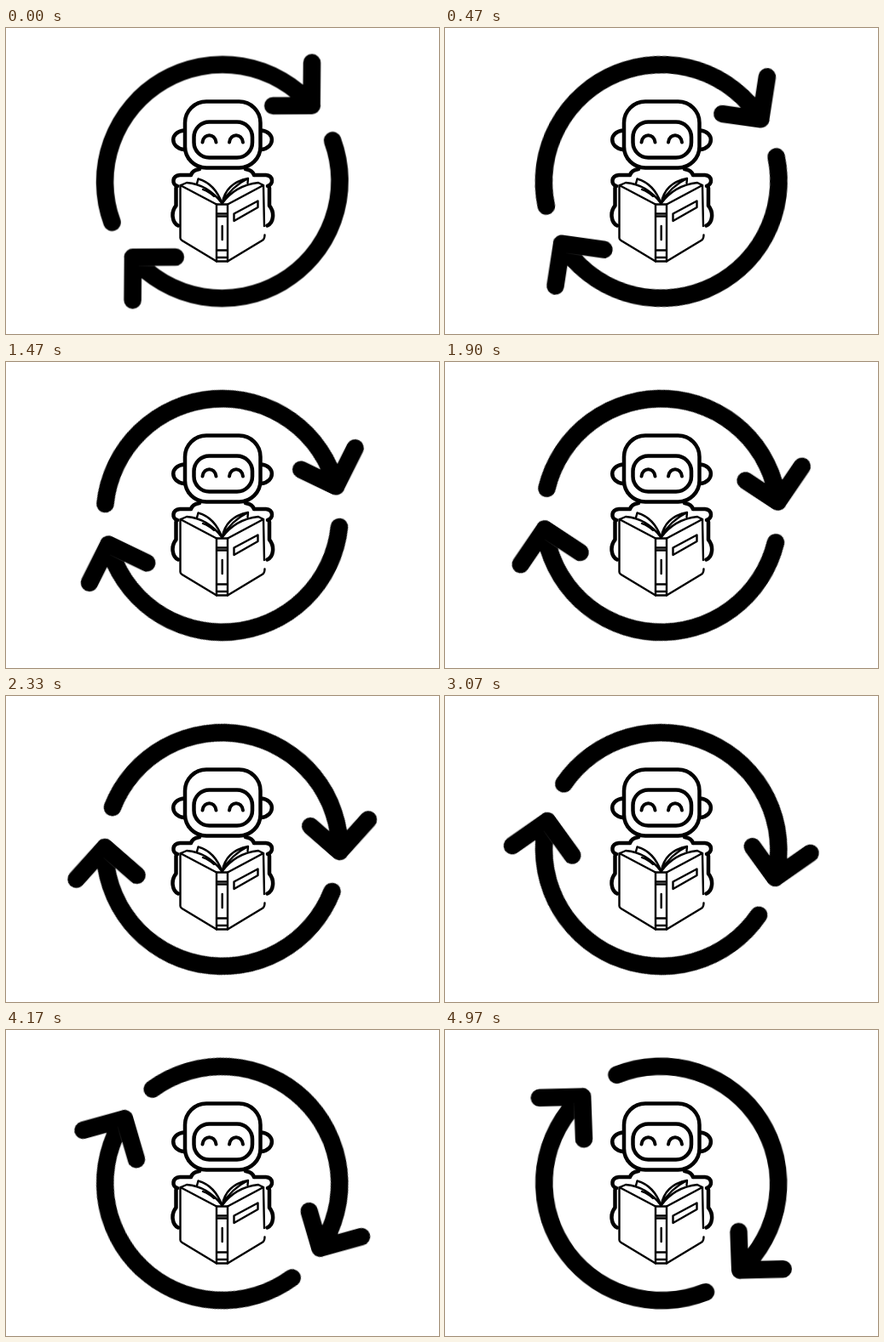
These frames come from a looping animation (508 px wide and 360 px high, 5010 ms). An HTML page:

```html
<!DOCTYPE html>
<html lang="en">
<head>
<meta charset="utf-8">
<title>Reading robot</title>
<style>
  html, body { margin: 0; width: 100%; height: 100%; overflow: hidden; background: #fff; }
  svg {
    display: block; width: 508px; height: 360px;
    fill: none; stroke: #000; stroke-linecap: round; stroke-linejoin: round;
  }
  .arrows { stroke-width: 20.6; animation: turn 5010ms infinite; }
  .robot { stroke-width: 4.5; }
  .eyes { stroke-width: 4; }
  .book { stroke-width: 2.4; }
  .cover { fill: #fff; stroke: none; }

  /* Thirty small steps a second, then a hard reset */
  @keyframes turn {
    0% { transform: rotate(0deg); animation-timing-function: steps(149, end); }
    98.98%, 100% { transform: rotate(88.2deg); }
  }
</style>
</head>
<body>
<svg viewBox="0 0 508 360">
  <g transform="translate(253.7 180.5)">
    <g class="arrows">
      <path d="M-129.3 48.1A138 138 0 0 1 105 -89.3M105.2 -139.6L104.8 -89.3L59.5 -89"/>
      <path transform="rotate(180)" d="M-129.3 48.1A138 138 0 0 1 105 -89.3M105.2 -139.6L104.8 -89.3L55 -89"/>
    </g>
  </g>

  <g class="robot">
    <rect x="210" y="86.5" width="88.500" height="78" rx="25"/>
    <rect x="220.500" y="110.500" width="68.500" height="42" rx="18"/>
    <path d="M209 120.500C192 122 192 141 209 143M299.500 120.500C316 122 316 141 299.500 143"/>
    <path class="eyes" d="M230.500 134.500C232 123.500 245 123.500 246.500 134.500M262 134.500C263.500 123.500 276.500 123.500 278 134.500"/>
    <path d="M227 166Q219 167 217 173M281 166Q289 167 291 173"/>
    <path d="M216 173H204C194.500 174 194.500 184 201 186M292 173H305C314 174 314 184 307 186"/>
    <path d="M199.500 188V209C193 217 195 229 202 232.500M309 188V209C315.500 217 314 229 306.500 232.500"/>
  </g>

  <g class="book">
    <path class="cover" d="M204.500 185L225 178L254 205L283 178L302 185V249L260 275H247L204.500 249Z"/>
    <path d="M247 207.500L204.500 185V247Q204.500 249 206.500 250L247 274.500M260 207.500L302 185L303 233M303.500 243.500Q303.500 248.500 300.500 250L260 274.500"/>
    <path d="M247 207.500H260V274.500H247ZM247 218.500H260M247 221.500H260M247 261.500H260M247 270H260M253.700 233V249"/>
    <path d="M267.500 218.500L295.500 203.500V211L267.500 227Z"/>
    <path d="M205 185L212 182Q237 184 253.500 206.500M224 183L225.500 177.500Q245 183 253.500 206.500M231 190Q239 193 244 198"/>
    <path d="M302 185L296 182Q269 185 253.500 206.500M283.500 182.500L284 177Q258 182 253.500 206.500M284 177Q264 187 254 205"/>
  </g>
</svg>
</body>
</html>
```
